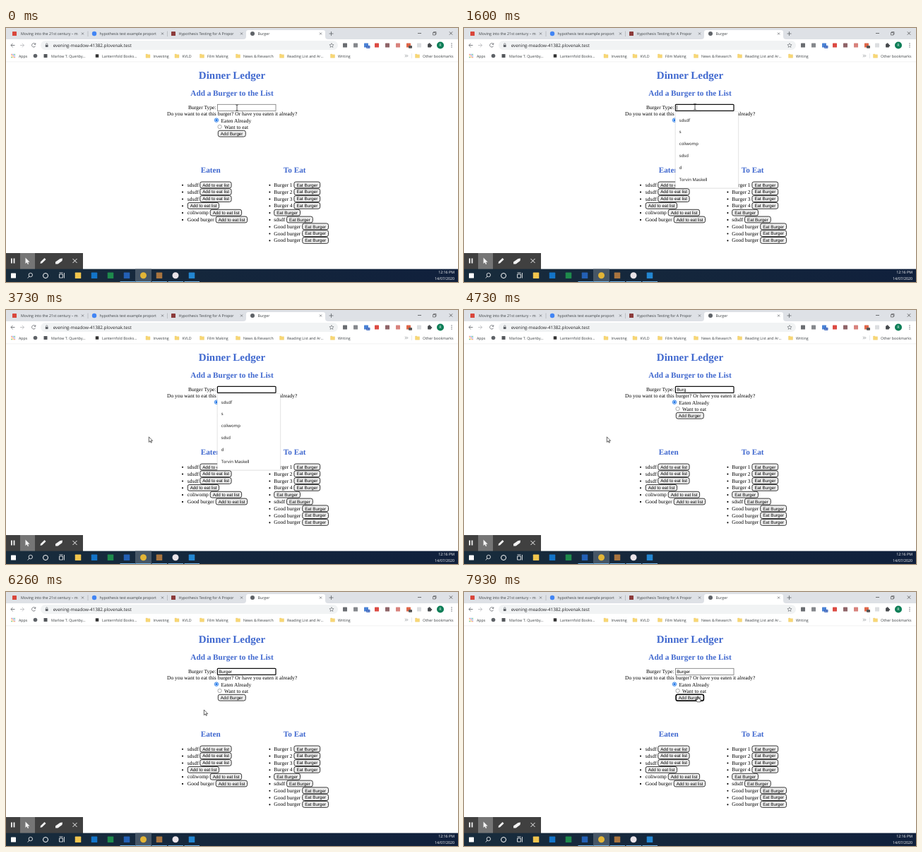
These frames come from a looping animation (640 px wide and 360 px high, 8000 ms). An HTML page:

```html
<!DOCTYPE html>
<html lang="en">
<head>
<meta charset="utf-8">
<title>Burger</title>
<style>
html, body { margin: 0; width: 100%; height: 100%; overflow: hidden; background: #fff; }
svg { display: block; width: 640px; height: 360px; }
text { text-rendering: geometricPrecision; white-space: pre; }
.ui { font-family: "Open Sans", "Noto Sans", sans-serif; font-size: 5.3px; fill: #3c4043; }
.page { font-family: "Liberation Serif", serif; font-size: 7.5px; fill: #000; }
.head { font-family: "Liberation Serif", serif; font-weight: bold; font-size: 11.24px; fill: #4169cf; text-anchor: middle; }
.ctl { font-family: "Liberation Sans", sans-serif; font-size: 6.25px; fill: #000; }
</style>
</head>
<body>
<svg id="stage" viewBox="0 0 640 360"></svg>
<script>
const text = (x, y, s, cls = 'ui', extra = '') =>
  `<text x="${x}" y="${y}" class="${cls}" ${extra}>${s.replace(/&/g, '&amp;')}</text>`;
const rect = (x, y, w, h, fill, extra = '') =>
  `<rect x="${x}" y="${y}" width="${w}" height="${h}" fill="${fill}" ${extra}/>`;
const dot = (x, y, r, fill, extra = '') =>
  `<circle cx="${x}" cy="${y}" r="${r}" fill="${fill}" ${extra}/>`;
const line = (d, color, width = 0.8, extra = '') =>
  `<path d="${d}" fill="none" stroke="${color}" stroke-width="${width}" ${extra}/>`;
const square = (x, y, size, fill) => rect(x - size / 2, y - size / 2, size, size, fill, 'rx=".6"');
const cross = (x, y, r, color, width) =>
  line(`M${x - r} ${y - r}l${2 * r} ${2 * r}m0 ${-2 * r}l${-2 * r} ${2 * r}`, color, width);
const group = (id, body) => `<g id="${id}">${body}</g>`;
const button = (x, y, w, label) =>
  rect(x, y, w, 8.8, '#efefef', 'rx="2.6" stroke="#222" stroke-width=".9"') + text(x + 3.5, y + 6.6, label, 'ctl');

function tabStrip() {
  const tabs = [
    [12, 'Moving into the 21st century – m'],
    [125, 'hypothesis test example proport'],
    [237, 'Hypothesis Testing for A Propor'],
    [349, 'Burger'],
  ];
  const icons = square(12, 8, 6, '#d9473c') + dot(125, 8, 3.2, '#4285f4') +
    square(237, 8, 6, '#8c3b3b') + dot(349, 8, 3, '#5f6368');
  return rect(0, 0, 640, 16, '#dee1e6') +
    `<path d="M336 16Q340 16 340 12V6Q340 3 343 3H449Q452 3 452 6V12Q452 16 456 16Z" fill="#fff"/>` +
    icons +
    tabs.map(([x, s]) => text(x + (x < 20 ? 9 : 7.5), 10, s) + cross(x + 96.5, 8, 1.5, '#5f6368', 0.7)).join('') +
    line('M116 4.500V12M228.500 4.500V12', '#9a9da1', 0.5) +
    line('M457.500 8H463.500M460.500 5V11', '#5f6368', 0.8) +
    line('M583 7.500H588', '#222', 0.6) +
    line('M604.500 6.500h3.500v3.500h-3.500zM605.500 6.500v-1h3.500v3.500h-1', '#222', 0.5) +
    cross(630, 7.5, 2.2, '#222', 0.6);
}

function toolbar() {
  const gray = '#5f6368';
  const extensions = ['#6a6d71', '#85888c', '#4b83d6', '#dc4a42', '#8f6468', '#d8827c', '#df6648', '#dcdee0'];
  return rect(0, 16, 640, 32, '#fff') +
    line('M12.500 24.500H7M9.600 21.800L6.900 24.500L9.600 27.200', gray) +
    line('M20 24.500H25.500M22.900 21.800L25.600 24.500L22.900 27.200', '#b5b7ba') +
    line('M41.500 22.800A2.700 2.700 0 1 0 41.700 25.500M41.800 21.300V23.300H39.700', gray) +
    rect(49, 18, 421, 13, '#f1f3f4', 'rx="6.5"') +
    rect(55.8, 24, 3.8, 3, gray, 'rx=".4"') + line('M56.600 24V22.800a1.100 1.100 0 0 1 2.200 0V24', gray, 0.6) +
    text(66.7, 26.6, 'evening-meadow-41382.plovenak.test', 'ui', 'style="font-size:6.3px;fill:#202124"') +
    line('M461 21.500l.9 2 2.200.2-1.700 1.500.5 2.200-1.900-1.200-1.900 1.200.5-2.200-1.700-1.500 2.200-.2z', gray, 0.6) +
    extensions.map((color, i) => square(480 + i * 15, 24.5, 6, color)).join('') +
    rect(510, 25, 5.5, 3.8, '#2b59b8', 'rx=".8"') +
    text(510.6, 28, '2m', 'ui', 'style="font-size:3.2px;fill:#fff"') +
    rect(570, 25, 5, 3.8, '#555', 'rx=".8"') +
    square(599.5, 25, 4.8, '#44474b') + dot(599.5, 22.3, 1.1, '#44474b') + dot(602.2, 25, 1.1, '#44474b') +
    dot(615, 24.5, 5, '#0b7d56') +
    text(615, 26.4, 'R', 'ui', 'text-anchor="middle" style="fill:#fff"') +
    [22, 24.5, 27].map(y => dot(631, y, 0.65, gray)).join('');
}

function bookmarks() {
  const folders = [[201, 'Investing'], [242, 'KVLD'], [277.5, 'Film Making'], [328.5, 'News & Research'],
    [390.5, 'Reading List and Ar...'], [462.5, 'Writing'], [582.5, 'Other bookmarks']];
  const folder = x => `<path d="M${x - 3} 37h2.200l.8.800h3v4.400h-6z" fill="#f8d775" stroke="#e3bd55" stroke-width=".3"/>`;
  const colors = ['#e05a4e', '#4285f4', '#34a853', '#f5b92e'];
  let grid = '';
  for (let i = 0; i < 9; i++) grid += square(8 + i % 3 * 2.1, 37.4 + Math.floor(i / 3) * 2.1, 1.4, colors[i % 4]);
  return grid + text(18, 41.6, 'Apps') + dot(41.5, 39.5, 2.8, '#5f6368') + square(56, 39.5, 5, '#55585c') +
    text(64, 41.6, 'Marlow T. Quenby...') + square(129, 39.5, 4.5, '#333') +
    text(136, 41.6, 'Lanternfold Books...') +
    folders.map(([x, s]) => folder(x) + text(x + 7.5, 41.6, s)).join('') +
    line('M565 37.800l1.600 1.700-1.600 1.700M567.200 37.800l1.600 1.700-1.600 1.700', '#5f6368', 0.6) +
    line('M574.500 36V43', '#d0d2d5', 0.5) + line('M0 47.800H640', '#e4e6e8', 0.5);
}

function burgerList(x, labelX, items, label, width) {
  return items.map(([name, offset], i) => {
    const y = 218 + i * 9.82;
    return dot(x, y + 4.8, 1.05, '#000') + text(labelX, y + 6.9, name, 'page') +
      button(labelX + offset, y, width, label);
  }).join('');
}

function page() {
  const eaten = [['sdsdf', 17.9], ['sdsdf', 17.9], ['sdsdf', 17.9], ['', 0.4], ['coliwomp', 32.4], ['Good burger', 40.4]];
  const toEat = [1, 2, 3, 4].map(n => ['Burger ' + n, 28.6])
    .concat([['', 0.4], ['sdsdf', 18.2]], Array(3).fill(['Good burger', 40.4]));
  return text(320, 72, 'Dinner Ledger', 'head', 'style="font-size:15px"') +
    text(320, 95.7, 'Add a Burger to the List', 'head') +
    text(258, 115, 'Burger Type:', 'page') +
    text(228, 124.4, 'Do you want to eat this burger? Or have you eaten it already?', 'page') +
    dot(298, 130.6, 2.7, '#fff', 'stroke="#1a73e8" stroke-width=".9"') + dot(298, 130.6, 1.6, '#1a73e8') +
    text(304.5, 133.6, 'Eaten Already', 'page') +
    dot(302.6, 140, 2.7, '#fff', 'stroke="#767676" stroke-width=".6"') +
    text(309, 143, 'Want to eat', 'page') +
    button(300.3, 145.3, 39, 'Add Burger') +
    group('pressed', rect(300.1, 145.1, 39.4, 9.2, 'none', 'rx="2.6" stroke="#000" stroke-width="1.4"')) +
    rect(299.4, 108.3, 82.6, 9.1, '#fff', 'id="field"') +
    text(301.2, 115, '', 'ctl', 'id="typed"') + rect(301.2, 109.8, 0.6, 6.4, '#000', 'id="caret"') +
    text(289.7, 205.2, 'Eaten', 'head') + text(408.7, 205.2, 'To Eat', 'head') +
    burgerList(250, 256.8, eaten, 'Add to eat list', 44.4) +
    burgerList(373.4, 379.3, toEat, 'Eat Burger', 36.8);
}

function suggestions() {
  const words = ['sdsdf', 's', 'coliwomp', 'sdsd', 'd', 'Torvin Maskell'];
  return rect(298.6, 119, 90.6, 108.8, '#000', 'opacity=".1" rx="1"') +
    rect(299.2, 118.3, 89.2, 108.6, '#fff', 'stroke="#dcdcdc" stroke-width=".4"') +
    words.map((s, i) => text(304.8, 132.6 + i * 16.86, s, 'ui', 'style="font-size:6px;fill:#111"')).join('');
}

function desktop() {
  const apps = [[102, '#f2c54d'], [125, '#1374c8'], [148, '#1e8a4c'], [171, '#2360b5'],
    [217, '#a8743f'], [263, '#2386d1']];
  const white = '#f4f4f4';
  return rect(0, 319, 109, 23, '#404040') + rect(20, 319, 21, 23, '#757575') +
    rect(7, 326.5, 1.8, 7, white) + rect(10.6, 326.5, 1.8, 7, white) +
    `<path d="M27.500 325.500v8.500l2-1.800 1.300 2.800 1.400-.6-1.300-2.700h2.700z" fill="${white}"/>` +
    `<path d="M48.500 334l.7-2.700 5.300-5.300 2 2-5.300 5.300z" fill="${white}"/>` +
    `<path d="M70 331.500l6.500-4.500 3.500-.5-.5 3.500-6 4.500h-3.500z" fill="${white}"/>` +
    cross(97.5, 330, 3, white, 1) +
    `<linearGradient id="bar"><stop stop-color="#182c3c"/><stop offset="1" stop-color="#10203c"/></linearGradient>` +
    rect(0, 341.6, 640, 18.4, 'url(#bar)') + rect(183, 341.6, 23, 18.4, '#465666') +
    square(10.5, 351, 7, '#fff') +
    dot(34.8, 350, 2.7, 'none', 'stroke="#fff" stroke-width=".8"') + line('M33 352l-2.300 2.500', '#fff', 0.8) +
    dot(56, 351, 3.5, 'none', 'stroke="#fff" stroke-width="1"') +
    line('M75.500 349h5v5h-5zM75.500 347h5M82.500 347v7.500', '#fff', 0.8) +
    apps.map(([x, c]) => square(x, 350.8, 8.5, c)).join('') +
    dot(194.5, 350.8, 4.5, '#e3b536') + dot(240, 350.8, 4.5, '#e9e3e8') +
    [161, 183, 206, 229, 252].map(x => rect(x + 0.5, 359, 21.5, 1, '#76b9ed')).join('') +
    text(635, 348.4, '12:16 PM', 'ui', 'text-anchor="end" style="fill:#fff"') +
    text(635, 357.4, '14/07/2020', 'ui', 'text-anchor="end" style="fill:#fff"');
}

const pointers =
  group('beam', line('M-1.700-4.200Q0-4.200 0-3.200Q0-4.200 1.700-4.200M0-3.200V3.200M-1.700 4.200Q0 4.200 0 3.200Q0 4.200 1.700 4.200', '#111', 0.7)) +
  group('arrow', '<path d="M0 0V7.500L1.800 5.900L3 8.400L4.100 7.900L3 5.500H5.300Z" fill="#fff" stroke="#000" stroke-width=".6"/>') +
  group('hand', '<path d="M-.7 0Q0-.8.7 0V3L3.800 3.800Q4.500 4 4.300 5L3.700 7.800H-.8L-2.800 4.800Q-2.300 3.800-.7 5Z" fill="#fff" stroke="#000" stroke-width=".6"/>');

const $ = id => document.getElementById(id);
$('stage').innerHTML = rect(0, 0, 640, 360, '#fff') + tabStrip() + toolbar() + bookmarks() + page() +
  group('menu', suggestions()) + desktop() + group('cursor', pointers);

// time, x, y
const path = [
  [0, 327, 113], [300, 327, 113], [600, 327, 111.5], [1900, 327, 111.5], [2460, 270, 117.5],
  [3060, 202.3, 179.8], [5860, 202.3, 179.8], [6600, 341, 157], [7000, 341, 157], [7400, 331, 148], [8000, 331, 148],
];
const LOOP = 8000, OPEN = 700, TYPE = 4200, KEY = 150, PRESS = 7800;
const show = (id, on) => $(id).setAttribute('visibility', on ? 'visible' : 'hidden');

function cursorAt(t) {
  const i = path.findIndex(p => p[0] > t);
  const [t0, x0, y0] = path[i - 1], [t1, x1, y1] = path[i];
  const u = (t - t0) / (t1 - t0), k = u * u * (3 - 2 * u);
  return [x0 + (x1 - x0) * k, y0 + (y1 - y0) * k];
}

function render(t) {
  const [x, y] = cursorAt(t);
  const overField = x > 299 && x < 382 && y > 108 && y < 117;
  const overButton = x > 300 && x < 339.5 && y > 145 && y < 154;
  const focused = t >= OPEN && t < PRESS;
  const count = t < TYPE ? 0 : Math.min(6, Math.floor((t - TYPE) / KEY) + 1);
  $('cursor').setAttribute('transform', `translate(${x} ${y})`);
  show('beam', overField);
  show('hand', overButton);
  show('arrow', !overField && !overButton);
  show('menu', t >= OPEN && t < TYPE);
  show('pressed', t >= PRESS);
  show('caret', focused && count === 0 && (t - OPEN) % 1000 >= 500);
  $('typed').textContent = 'Burger'.slice(0, count);
  $('field').setAttribute('stroke', focused ? '#101010' : '#767676');
  $('field').setAttribute('stroke-width', focused ? 1.25 : 0.8);
  $('field').setAttribute('rx', focused ? 1 : 0);
}

const start = performance.now();
function tick() {
  render((performance.now() - start) % LOOP);
  requestAnimationFrame(tick);
}
tick();
</script>
</body>
</html>
```
